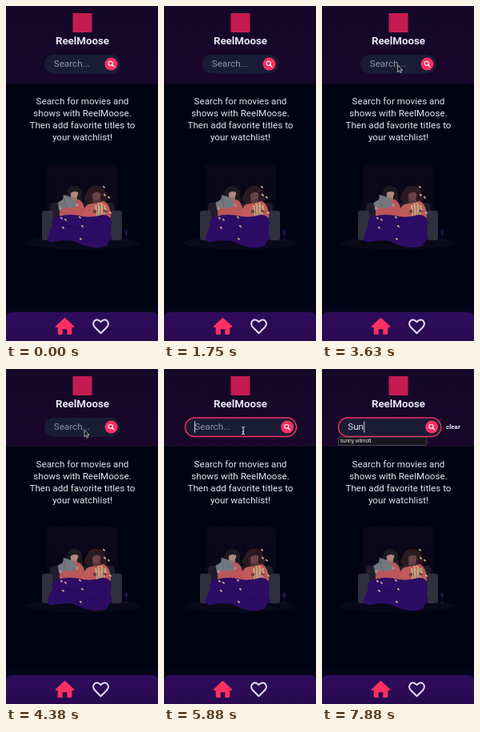
These frames come from a looping animation (190x419 px, 8 s). An HTML page:

```html
<!DOCTYPE html>
<html lang="en">
<head>
<meta charset="utf-8">
<title>ReelMoose</title>
<style>
html, body { margin: 0; width: 100%; height: 100%; overflow: hidden; background: #000412; }
svg { display: block; width: 100%; height: 100%; }
text { font-family: Roboto, Inter, sans-serif; fill: #e6e6f4; }
.small { font-family: "Liberation Sans", Arial, sans-serif; font-size: 6.4px; }
</style>
</head>
<body>
<svg viewBox="0 0 190 419" preserveAspectRatio="none">
  <defs>
    <linearGradient id="bar" x2="0" y2="1">
      <stop offset="0" stop-color="#150727"/><stop offset="1" stop-color="#18082b"/>
    </linearGradient>
    <linearGradient id="foot" x2="0" y2="1">
      <stop offset="0" stop-color="#2f0c5d"/><stop offset="1" stop-color="#280a50"/>
    </linearGradient>
    <linearGradient id="glow" x2="0" y2="1">
      <stop offset="0" stop-color="#1c0938" stop-opacity="0"/><stop offset="1" stop-color="#1c0938" stop-opacity="0.5"/>
    </linearGradient>
  </defs>
  <rect width="190" height="419" fill="#000412"/>
  <rect width="190" height="97" fill="url(#bar)"/>

  <rect x="83.5" y="9" width="24" height="24" fill="#c41c50"/>
  <text x="95.5" y="47.5" font-size="13.3" font-weight="700" text-anchor="middle">ReelMoose</text>

  <!-- search field -->
  <rect id="pill" y="61" height="23.4" rx="11.7" fill="#1a1c36" stroke="#f2315f"/>
  <text id="field" y="76.4" font-size="11.7"></text>
  <rect id="caret" y="65.5" width="0.9" height="14" fill="#e6e6f4"/>
  <g id="button">
    <circle r="8" fill="#fb3060"/>
    <circle cx="-0.8" cy="-0.8" r="2.6" fill="none" stroke="#fff" stroke-width="1.1"/>
    <path d="M1.2 1.2L3.5 3.5" stroke="#fff" stroke-width="1.3" stroke-linecap="round"/>
  </g>
  <g id="extras">
    <text x="155" y="75" font-size="8" font-weight="700">clear</text>
    <rect x="20.5" y="85.3" width="110.5" height="10.2" rx="1.2" fill="#18171d" stroke="#56545c" stroke-width="0.8"/>
    <text class="small" x="22.8" y="92.4">sunny wilmott</text>
  </g>

  <g font-size="11.65" text-anchor="middle">
    <text x="95.5" y="123">Search for movies and</text>
    <text x="95.5" y="138.1">shows with ReelMoose.</text>
    <text x="95.5" y="153.2">Then add favorite titles to</text>
    <text x="95.5" y="168.3">your watchlist!</text>
  </g>

  <!-- couple on the sofa -->
  <ellipse cx="95" cy="296.5" rx="72" ry="8" fill="#090919"/>
  <path d="M51 270V204Q51 197 58 197H133Q140 197 140 204V270Z" fill="#0a0719"/>
  <path d="M55 209H136M66 198V262M95 198V262M124 198V262" stroke="#110c22" stroke-width="1"/>
  <rect x="55" y="246" width="81" height="40" rx="5" fill="#1f1d2b"/>
  <path d="M76 245Q73 225 86 225Q96 226 95 239Q98 246 94 250H80Z" fill="#1d1b22"/>
  <path d="M67 264Q66 249 76 244L91 242Q100 247 98 264Z" fill="#bb5659"/>
  <path d="M81 236H89V243Q85 246 81 243Z" fill="#957069"/>
  <ellipse cx="85.5" cy="234" rx="4.8" ry="6" fill="#b08780"/>
  <path d="M78 237Q78 226 86 226Q92 227 92 234Q84 229 78 237Z" fill="#1d1b22"/>
  <path d="M64.5 246L71 242L72 236L81 239L88 246L89 250L81 253L73 252L67 257Z" fill="#737780"/>
  <path d="M72 236L75 252" stroke="#5b5f68" stroke-width="0.7"/>
  <circle cx="68" cy="253" r="2" fill="#b08780"/>
  <circle cx="89" cy="249" r="2" fill="#b08780"/>
  <path d="M98 243Q97 238 101 234Q103 225 113 225Q122 225 124 233Q129 239 124 246H102Z" fill="#2b1b21"/>
  <path d="M96 265Q96 251 103 248L122 244Q131 248 131 265Z" fill="#c15b59"/>
  <path d="M108 238H118V245Q113 249 108 245Z" fill="#5a373a"/>
  <ellipse cx="113" cy="236.5" rx="5.2" ry="6.2" fill="#6c4344"/>
  <path d="M107 237Q106 228 114 229Q119 229 119 234Q111 231 107 237Z" fill="#2b1b21"/>
  <path d="M111 249H125L123 263H113Z" fill="#c5a981"/>
  <path d="M114 249L115 263M118 249V263M122 249L121 263" stroke="#a35b55" stroke-width="1.1"/>
  <circle cx="111" cy="257" r="2.3" fill="#6c4344"/>
  <circle cx="124" cy="256" r="2.3" fill="#6c4344"/>
  <rect x="45" y="256" width="14" height="37" rx="3" fill="#302f3d"/>
  <rect x="131" y="256" width="14" height="37" rx="3" fill="#302f3d"/>
  <path d="M52 291Q54 281 58 275Q55 264 66 263Q80 259 95 263Q109 265 121 261Q132 261 132 273Q129 281 133 290Q128 294 126 300Q115 304 103 301Q92 298 85 294Q70 292 60 295Q52 296 52 291Z" fill="#2d0c65"/>
  <path d="M70 272Q82 279 93 277M101 287Q112 288 121 283" fill="none" stroke="#250957" stroke-width="1"/>
  <g id="corn" fill="#cdb58c"></g>
  <path d="M148.3 280H152.2L151.8 285Q150.2 288 148.7 285ZM150 286H150.6V292H152.4V293H148.2V292H150Z" fill="#28104f"/>

  <!-- bottom bar -->
  <rect y="371" width="190" height="20" fill="url(#glow)"/>
  <path d="M0 419V391Q0 383 8 383H182Q190 383 190 391V419Z" fill="url(#foot)"/>
  <path d="M73.5 389.8L85.3 400.7Q85.6 402 84.3 402H82.3V409.4Q82.3 411 80.7 411H76.3V404.2H70.7V411H66.3Q64.7 411 64.7 409.4V402H62.7Q61.4 402 61.7 400.7Z" fill="#fb3060"/>
  <path d="M118.5 409.2L111 401.7C105.5 395.8 113 388.6 118.5 395.2C124 388.6 131.5 395.8 126 401.7Z" fill="none" stroke="#e3e0f5" stroke-width="2" stroke-linejoin="round"/>

  <path id="arrow" d="M0 0V8.5L2 6.7L3.4 9.7L4.9 9L3.5 6.2H6.2Z" fill="#15131a" stroke="#e6e6ea" stroke-width="0.7"/>
  <path id="beam" d="M-2 -4.5Q0 -4.5 0 -3.3Q0 -4.5 2 -4.5M0 -3.3V3.5M-2 4.7Q0 4.7 0 3.5Q0 4.7 2 4.7M-1 1.5H1" fill="none" stroke="#e8e6ee" stroke-width="1"/>
</svg>
<script>
const LOOP = 8000, STEP = 125;
const FOCUS = 4500, TYPE = 7250;
const $ = id => document.getElementById(id);
const set = (id, attrs) => { for (const k in attrs) $(id).setAttribute(k, attrs[k]); };
const show = (id, on) => set(id, { visibility: on ? 'visible' : 'hidden' });
const mix = (a, b, p) => a + (b - a) * p;
const ease = (t, from, to) => {
  const p = Math.min(1, Math.max(0, (t - from) / (to - from)));
  return p * p * (3 - 2 * p);
};

const corn = [[122, 226], [123, 236], [128, 239], [115, 247], [119, 247], [124, 254], [130, 258],
  [69, 265], [74, 267], [92, 264], [95, 275], [71, 277], [93, 291]];
$('corn').innerHTML = corn.map(([x, y]) =>
  `<circle cx="${x}" cy="${y}" r="1.1"/><circle cx="${x + 1}" cy="${y + 0.9}" r="0.9"/>`).join('');

// pointer stops: time, x, y
const stops = [[1900, 12, 322], [2300, 59, 294.5], [2600, 59, 294.5], [3500, 94.5, 74], [4100, 94.5, 74], [4500, 99, 77]];
function pointer(t) {
  let [, x, y] = stops[0];
  for (let i = 1; i < stops.length; i++) {
    const p = ease(t, stops[i - 1][0], stops[i][0]);
    x = mix(x, stops[i][1], p);
    y = mix(y, stops[i][2], p);
  }
  return `translate(${x} ${y})`;
}

const keys = [[TYPE, 'S'], [7500, 'Su'], [7750, 'Sun']];

function draw(t) {
  const open = ease(t, FOCUS - STEP, FOCUS + 250);
  const shift = ease(t, TYPE - STEP, TYPE + 200);
  const left = mix(mix(48, 26.5, open), 20.5, shift);
  const right = mix(mix(143, 165.5, open), 148.7, shift);
  const focused = t >= FOCUS, typing = t >= TYPE;
  set('pill', { x: left, width: right - left, 'stroke-width': focused ? 1.5 : 0 });
  set('button', { transform: `translate(${right - 11.5} 72.6)` });

  const typed = keys.reduce((s, [at, text]) => t >= at ? text : s, '');
  const field = $('field');
  field.textContent = typed || 'Search...';
  set('field', { x: left + 11.7 });
  field.style.fill = typed ? '#e6e6f4' : '#8f91a5';

  const width = typed ? field.getComputedTextLength() : -0.5;
  set('caret', { x: left + 12 + width });
  show('caret', typing || (t >= 5400 && (t - 5400) % 1100 < 550));
  show('extras', typing);

  set('arrow', { transform: pointer(t) });
  set('beam', { transform: pointer(t) });
  show('arrow', t >= 2000 && !focused);
  show('beam', focused && !typing);
}

const start = performance.now();
function tick() {
  const t = (performance.now() - start) % LOOP;
  draw(Math.floor(t / STEP) * STEP);
  requestAnimationFrame(tick);
}
tick();
</script>
</body>
</html>
```
